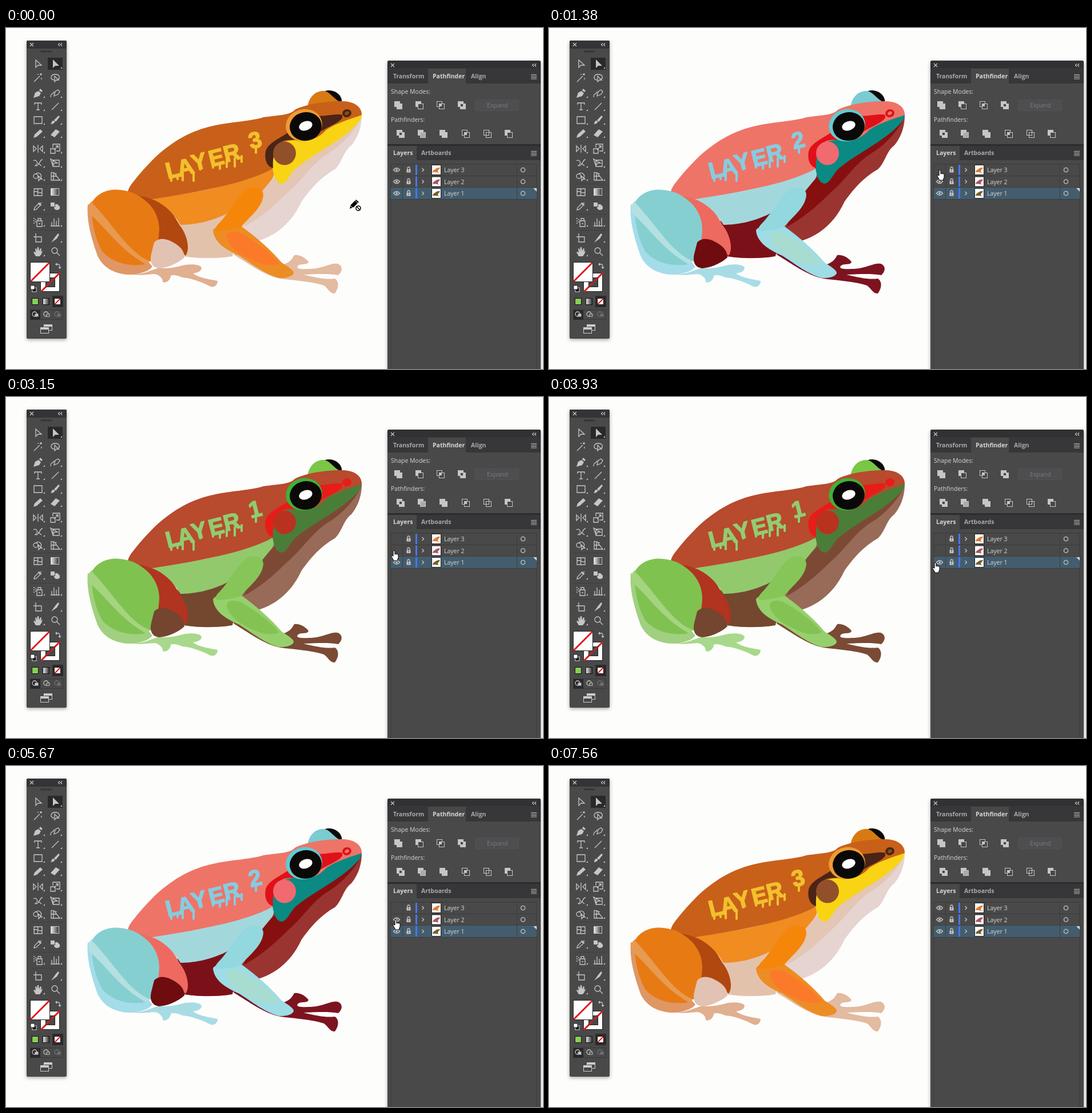
Recreate the animation shown at these times as an HTML page. Size 939 by 596 pixels, loop 7.59 s.

```html
<!DOCTYPE html>
<html lang="en">
<head>
<meta charset="utf-8">
<title>Layer visibility</title>
<style>
html, body { margin: 0; width: 100%; height: 100%; overflow: hidden; background: #fdfdfc; }
svg { display: block; width: 939px; height: 596px; font: 10.5px "Open Sans", "Noto Sans", sans-serif; }
.ui { fill: #d6d6d6; }
.bold { font-weight: 700; }
.dim { fill: #a9a9ac; }
.line { fill: none; stroke: #c6c6c6; stroke-width: 1.3; }
.solid { fill: #c6c6c6; }
.drip { font: 700 40px "Liberation Sans", Arial, sans-serif; fill: var(--text); stroke: var(--text); stroke-width: 1.6; stroke-linejoin: round; }
.p1 { --back: #b84a2e; --bump: #7ac646; --flank: #92c96c; --thigh: #80c250; --lower: #a0d080; --stripe: #a4d480;
  --arm: #86c658; --fore: #96d06c; --shine: #84c254; --belly: #74472f; --throat: #7c4a34; --outer: #986a58;
  --jaw: #4a7e38; --mask: #e81c18; --cheek: #b8321f; --inner: #b03420; --heel: #74452f; --ring: #40b038;
  --hand: #7a4a34; --foot: #a8d88c; --text: #92cc70; --nose: #e81c18; --hole: #e81c18; }
.p2 { --back: #ee7468; --bump: #7acbd2; --flank: #a2d8dc; --thigh: #86cfd0; --lower: #a4dcea; --stripe: #b4e0e2;
  --arm: #92d8de; --fore: #9edce6; --shine: #a8dcd0; --belly: #7c1018; --throat: #861010; --outer: #9a3430;
  --jaw: #0a8a82; --mask: #e01018; --cheek: #f06a70; --inner: #ee6a60; --heel: #6e0c10; --ring: #62cbd0;
  --hand: #7c1420; --foot: #a8dce4; --text: #86cce0; --nose: #e01018; --hole: #ee7468; }
.p3 { --back: #c8601a; --bump: #d87a12; --flank: #f08c20; --thigh: #e87a14; --lower: #df9765; --stripe: #e79a50;
  --arm: #f5860a; --fore: #ee8c24; --shine: #fa7a2a; --belly: #e3c2ac; --throat: #e4c6b4; --outer: #e6d4d0;
  --jaw: #f8d414; --mask: #4a2416; --cheek: #92502a; --inner: #b0480f; --heel: #e2c2b2; --ring: #ee9c34;
  --hand: #e2bba0; --foot: #e0b090; --text: #f2c02c; --nose: #4a2416; --hole: #80520e; }
</style>
</head>
<body>
<svg id="stage" viewBox="0 0 939 596">
  <defs>
    <linearGradient id="fade"><stop stop-color="#eee"/><stop offset="1" stop-color="#333"/></linearGradient>
    <filter id="shadow" x="-20%" y="-5%" width="140%" height="112%"><feDropShadow dx="0" dy="2" stdDeviation="3" flood-opacity=".35"/></filter>
  </defs>
  <g id="frog"></g>
  <g id="tools"></g>
  <g id="panel"></g>
  <g id="pencil">
    <path d="M-8 8L-6 1 3-8 8-4-1 5Z"/>
    <path d="M-6 3L-3 6M1-7L6-2" stroke="#fff"/>
    <circle cx="7" cy="7" r="4" fill="#fff" stroke="#000" stroke-width="1.6"/>
    <path d="M4 4L10 10" stroke="#000" stroke-width="1.5"/>
  </g>
  <path id="pointer" d="M-3-7C-3-9 0-9 0-7V-2C1-4 3-3 3-2 4-3 6-2 6-1V4L4 9H-2L-6 2C-7 0-5-1-3 1Z"
    fill="#fff" stroke="#111" stroke-width="1.1" stroke-linejoin="round"/>
</svg>
<script>
const $ = id => document.getElementById(id);
const rect = (x, y, w, h, fill, more = '') => `<rect x="${x}" y="${y}" width="${w}" height="${h}" fill="${fill}" ${more}/>`;
const oval = (x, y, rx, ry, fill, turn = 0) =>
  `<ellipse cx="${x}" cy="${y}" rx="${rx}" ry="${ry}" transform="rotate(${turn} ${x} ${y})" style="fill:${fill}"/>`;
const label = (x, y, text, cls = '') => `<text x="${x}" y="${y}" class="ui ${cls}">${text}</text>`;
const icon = (x, y, d, cls = 'line') => `<path transform="translate(${x} ${y})" class="${cls}" d="${d}"/>`;
const skin = (part, d) => `<path style="fill:var(--${part})" d="${d}"/>`;
const bodyGrey = '#484849', iconGrey = '#c6c6c6';

function drawFrog() {
  return oval(569, 124, 19, 14, '#0b0908', 25) +
  skin('bump', 'M527 138C531 117 543 110 556 110C568 112 572 124 586 130L560 140Z') +
  skin('outer', 'M622 153C622 178 612 195 604 205C590 215 588 235 575 247C548 262 530 285 517 303C500 340 470 368 425 376L390 400C360 404 330 402 312 399L295 340L450 240Z') +
  skin('throat', 'M621 156C612 180 585 205 570 215C535 235 520 265 490 290C465 315 440 335 415 348L440 290L468 262L500 240Z') +
  skin('belly', 'M300 340L440 300L412 347C400 370 400 380 396 399C360 404 330 402 312 399Z') +
  skin('flank', 'M240 298C330 292 420 270 468 242C470 255 468 262 462 268L448 285L420 300L385 325C355 340 325 344 305 344C295 325 270 305 240 298Z') +
  skin('back', 'M213 288C213 280 220 272 228 262C262 220 300 188 350 174C385 164 425 164 450 156C480 152 497 152 505 143C520 134 560 127 590 128C612 129 623 140 622 153C600 160 575 170 555 190L470 225C468 232 469 240 466 246C420 272 330 288 250 300C235 296 220 292 213 288Z') +
  skin('jaw', 'M622 152C600 160 580 165 560 178C545 195 525 200 505 196C485 196 470 205 466 220V245C468 258 472 271 482 272C492 270 495 258 505 247C530 225 575 203 602 179C614 168 622 160 622 152Z') +
  skin('mask', 'M588 152C578 149 562 154 545 154L550 181C566 171 582 166 588 157ZM498 178C488 190 458 198 454 216C451 232 458 243 467 245C466 226 470 206 482 199C492 193 506 197 520 196Z') +
  oval(487, 219, 20, 20.5, 'var(--cheek)') +
  oval(521, 170, 32, 28, 'var(--ring)', -14) +
  oval(524, 172, 28, 25, '#0b0908', -10) +
  oval(524, 171, 12, 8, '#fff', -20) +
  oval(596, 149, 8, 7, 'var(--nose)', -15) + oval(596, 149, 4, 3, 'var(--hole)', -30) +
  skin('foot', 'M215 428C235 434 250 424 268 419C285 422 300 417 313 414C328 412 342 414 342 420C341 426 333 428 327 429C340 438 357 439 370 442C370 449 364 454 358 452C346 446 326 437 308 436C300 432 292 431 288 433C288 441 279 447 274 444C275 437 266 430 258 430C240 432 225 433 215 428Z') +
  skin('inner', 'M225 292C260 296 288 312 303 344C318 362 322 388 314 398C300 385 275 372 262 372L266 345C264 320 250 302 225 292Z') +
  skin('lower', 'M143 308C140 340 152 375 160 398C172 424 198 432 222 431C242 428 250 424 256 417L242 400L160 312Z') +
  skin('thigh', 'M150 326C152 350 158 372 168 390C185 410 215 418 244 413C205 388 180 350 150 326Z') +
  skin('stripe', 'M150 303C141 310 143 320 147 326C172 345 198 388 245 413L255 405C220 390 190 340 150 303Z') +
  skin('thigh', 'M150 305C165 280 195 278 222 288C252 302 268 325 268 352C267 375 262 395 253 408C215 395 185 340 150 305Z') +
  skin('heel', 'M259 375C268 365 282 369 291 374C305 381 312 390 312 401C300 412 282 419 268 420C254 418 251 408 254 395Z') +
  skin('hand', 'M400 392C430 405 470 415 486 413C497 409 500 404 504 397C512 395 525 402 529 409C527 415 517 411 511 415C506 420 512 422 530 421C555 421 566 410 580 412C590 416 588 426 581 432C565 429 545 430 520 431C545 437 560 440 575 438C583 443 582 455 575 464C566 464 564 456 556 450C530 442 500 441 480 438C450 432 425 412 398 396Z') +
  skin('fore', 'M362 354C364 345 390 345 412 347C440 367 465 390 482 410C495 418 504 424 503 429C498 437 485 437 478 437C455 432 430 412 408 398C385 388 364 375 362 354Z') +
  skin('shine', 'M386 366C384 355 400 354 411 359C440 375 465 395 477 411C470 417 455 414 445 412C415 400 392 388 386 366Z') +
  skin('arm', 'M450 292C450 278 432 276 422 281C400 298 390 325 370 344C362 354 366 356 380 354C395 352 405 351 412 347C425 330 448 315 450 292Z') +
  `<text class="drip" x="283 303 328 358 384 414 428" y="264 260 250 243 235 220 212" rotate="-14">LAYER <tspan id="digit"></tspan></text>
  <path style="stroke:var(--text)" stroke-width="4" stroke-linecap="round" fill="none"
    d="M289 260v7M300 257v7M309 254v12M328 252v15M340 242v5M362 240v4M374 236v10M386 230v13M400 228v14M412 224v10M437 206v12"/>`;
}

// A leading star marks a filled icon
const toolIcons = [
  'M-4-7V6L0 2H6Z', '*M-4-8V7L0 3H7Z',
  'M-7 7L3-3M5-8v4M3-6h4M0-7v2M6 0v3', 'M-2 4C-10 3-8-6 0-6S9 0 5 3M-1-3V7L2 4H6Z',
  '*M-8 8L-5-1 1-4 5 0 2 5ZM2-5L4-8 8-4 6-2Z', 'M-8 7C-8-2-3 4-2-3M-2 5L0-3 5-6 8-3 5 2Z',
  'M-6-3V-6H6V-3M0-6V6M-3 6H3', 'M-6 6L6-6',
  'M-7-6H7V6H-7Z', '*M-8 7C-6 6-7 1-3 1S0 7-8 7ZM-2 0L6-8 8-6 1 3Z',
  '*M-8 8L-6 2 4-7 8-3-2 6Z', '*M-8 3L1-7 8-3-1 7Z',
  'M-8-5V5L-3 0ZM8-5V5L3 0ZM0-7V7', 'M-8 0H0V8H-8ZM-4-2V-8H8V4H2M-2 2L5-5M1-5H5V-1',
  'M-8-4C-2-8 2 2-6 5M-4 5C4 4 2-6 8-6M0 0L6 5', 'M-4-5H7V6H-4ZM-8-7L-4 5-1 0H4Z',
  'M-8 0A4 4 0 1 1 0 0A4 4 0 1 1-8 0M-4-4A5 5 0 1 1 4 4M1 0V8L4 5H7Z', 'M-7-7V7H8L-2-6M-7 0H3M-3-7V7M-7-7L3-4',
  'M-7-6H7V6H-7ZM-7 0C-2-5 2 5 7 0M-2-6C3-2-3 2 0 6', '',
  'M-7 7L-6 3 1-4 4-1-3 6ZM1-6L6-1M3-3L6-6', '*M-8-6H-1V1H-8ZM0-3H4L8 1V5L5 7H1L-2 4V2H0Z',
  'M-2-2H7V8H-2ZM0-2V-6H5V-2M1 3h3M-8-6h2M-8-2h2M-8 2h2M-5-4h2M-5 0h2', 'M-8 7H8M-6 7V0M-2 7V-6M2 7V-2M6 7V-7',
  'M-4-8V4M-8-2H6V7H-4V4', '*M-7 8L0-2 5-8 7-6 3 1Z',
  '*M-4 8L-8 1-6 0-4 2-5-5-3-6-2-1-1-8H1L2-1 4-6 6-5 5 0 8-2 6 4 3 8Z', 'M-6-2a5 5 0 1 1 10 0a5 5 0 1 1-10 0M3 2L8 7'
];
const toolRows = [63, 87, 114, 137, 161, 184, 211, 236, 259, 287, 311, 339, 367, 391];
const singleTools = [0, 2, 3, 18, 19, 21, 24, 27];

function drawTools() {
  let s = rect(36, 22, 70, 521, bodyGrey, 'rx="2" filter="url(#shadow)"') + rect(36, 22, 70, 14, '#343436', 'rx="2"') +
    icon(45, 29, 'M-3-3L3 3M3-3L-3 3') + icon(95, 29, 'M-1-2.5L-3.5 0-1 2.5M3-2.5L.5 0 3 2.5') +
    '<path d="M61 41H80" stroke="#2d2d30" stroke-width="3" stroke-dasharray="2 1"/>' +
    rect(73, 52, 26, 21, '#29292b');
  toolIcons.forEach((d, i) => {
    const x = i % 2 ? 86 : 56, y = toolRows[i >> 1], solid = d[0] == '*';
    s += icon(x, y, solid ? d.slice(1) : d, solid ? 'solid' : 'line');
    if (!singleTools.includes(i)) s += icon(x + 12, y + 8, 'M0-3V0H-3Z', 'solid');
  });
  s += rect(78.5, 280.5, 14, 12, 'url(#fade)', 'stroke="#ccc"');
  [272, 325, 353].forEach(y => s += rect(42, y, 58, 1, '#3f3f41'));
  const red = (x, y, n, w) => `<path d="M${x} ${y + n}L${x + n} ${y}" stroke="#e01818" stroke-width="${w}"/>`;
  s += rect(60.5, 428.5, 33, 32, '#fff', 'stroke="#222"') + red(61, 428, 33, 3) +
    rect(69.5, 436.5, 16, 16, bodyGrey, 'stroke="#222"') + red(70, 437, 15, 2) +
    rect(42.5, 409.5, 34, 34, '#fff', 'stroke="#222"') + red(43, 410, 33, 3) +
    icon(91, 416, 'M-4-3H1Q3-3 3 4M-2-5L-4-3-2-1M1 2L3 4 5 2') +
    rect(46, 454, 7, 7, '#111', 'stroke="#ddd"') + rect(43, 450, 7, 7, '#fff', 'stroke="#222"') +
    rect(81, 468, 19, 20, '#2b2b2d') +
    rect(45.5, 472.5, 11, 11, '#86cf57', 'stroke="#111"') + rect(64.5, 472.5, 11, 11, 'url(#fade)', 'stroke="#111"') +
    rect(84.5, 472.5, 11, 11, '#fff', 'stroke="#111"') + red(85, 473, 10, 2) +
    rect(42.5, 492.5, 57, 17, 'none', 'stroke="#39393b"') + rect(43, 493, 17, 17, '#29292b');
  [51, 71, 90].forEach((x, i) => s += `<g opacity="${i > 1 ? .3 : 1}">` +
    `<circle cx="${x - 1}" cy="500" r="4" class="line"/>` + rect(x, 500, 5, 4, i == 1 ? bodyGrey : iconGrey, `stroke="${iconGrey}"`) + '</g>');
  return s + rect(66.5, 518.5, 14, 10, bodyGrey, 'stroke="#ccc"') + rect(67, 519, 14, 3, '#ccc') +
    rect(60.5, 523.5, 14, 10, bodyGrey, 'stroke="#ccc"') + rect(61, 524, 14, 3, '#ccc');
}

const squares = (x, y, back, front, cut) => rect(x - 6.5, y - 6.5, 9, 9, back, `stroke="${iconGrey}"`) +
  rect(x - 2.5, y - 2.5, 9, 9, front, `stroke="${iconGrey}"`) + (cut ? rect(x - 2, y - 2, 4, 4, cut) : '');
const menu = y => [0, 2.5, 5, 7.5].map(d => rect(918, y + d, 10, 1, '#b8b8b8')).join('');

function drawPanel() {
  const body = bodyGrey, grey = iconGrey;
  let s = rect(667, 57, 268, 560, body, 'rx="3" filter="url(#shadow)"') + rect(667, 57, 268, 15, '#313133', 'rx="3"') +
    rect(667, 70, 268, 27, '#373739') + rect(738, 71, 66, 26, body) + rect(667, 203, 268, 28, '#373739') +
    rect(667, 203, 268, 3, '#2c2c2e') + rect(667, 206, 51, 25, body) +
    icon(676, 65, 'M-3-3L3 3M3-3L-3 3') + icon(924, 65, 'M-1-2.5L-3.5 0-1 2.5M3-2.5L.5 0 3 2.5') +
    label(677, 88, 'Transform', 'bold dim') + label(746, 88, 'Pathfinder', 'bold') + label(813, 88, 'Align', 'bold dim') + menu(81) +
    label(673, 115, 'Shape Modes:') + label(673, 164, 'Pathfinders:') +
    rect(820.5, 125.5, 76, 19, '#4e4e50', 'rx="2" stroke="#525254"') +
    '<text x="841" y="139" fill="#7b7b7e">Expand</text>' +
    label(677, 222, 'Layers', 'bold') + label(726, 222, 'Artboards', 'bold dim') + menu(215);
  s += squares(686, 135, grey, grey) + squares(723, 135, grey, body) + squares(760, 135, body, body, grey) +
    squares(797, 135, grey, grey, body) + squares(690, 185, grey, grey, body) + squares(727, 185, grey, '#aaa') +
    squares(765, 185, grey, grey) + squares(804, 185, body, body, grey) + squares(842, 185, 'none', 'none') + squares(879, 185, grey, body);
  s += rect(673, 238, 255, 370, 'none', 'stroke="#3b3b3d"');
  [3, 2, 1].forEach((n, i) => {
    const y = 248 + i * 20.5, frogTone = { 3: '#e07a30', 2: '#a85560', 1: '#74602a' }[n];
    if (n == 1) s += rect(673, y - 10, 255, 20, '#445d6e');
    s += rect(673, y + 10, 255, 1, '#3b3b3d') + rect(693, y - 10, 1, 20, '#3e3e40') + rect(893, y - 10, 1, 20, '#3e3e40') +
      `<g id="eye${n}">` + icon(683, y, 'M-5.5 0Q0-6.5 5.5 0Q0 6.5-5.5 0Z') + `<circle cx="683" cy="${y}" r="1.8" class="solid"/></g>` +
      icon(704, y, 'M-2-1V-3A2 2 0 0 1 2-3V-1') + rect(700.5, y - 1, 7, 5.5, grey) + rect(703.5, y, 1, 3, body) +
      rect(716, y - 9, 3, 18, '#4478f0') + icon(729, y, 'M-1.5-3L1.5 0-1.5 3') +
      rect(744.5, y - 8.5, 16, 17, '#fff', 'stroke="#222"') +
      `<path transform="translate(753 ${y})" fill="${frogTone}" d="M-7 4Q-6 0-3-1 0-4 5-4L6-3 3 0 2 3 4 5-2 4Z"/>` +
      label(766, y + 4, 'Layer ' + n) + `<circle cx="904" cy="${y}" r="3.6" class="line"/>`;
  });
  return s + '<path d="M922 280H928V286Z" fill="#d6d6d6"/>';
}

$('frog').innerHTML = drawFrog();
$('tools').innerHTML = drawTools();
$('panel').innerHTML = drawPanel();

// Cursor stops: time, x, y
const stops = [[0, 609, 308], [350, 609, 308], [1050, 685, 257], [2250, 685, 257], [2790, 680, 277], [3250, 680, 277],
  [3900, 677, 298], [4860, 684, 300], [5350, 683, 277], [5800, 683, 277], [6330, 655, 260], [6650, 684, 256], [6850, 684, 256], [7050, 960, 290]];

function cursorAt(t) {
  const i = stops.findIndex(s => s[0] > t);
  if (i < 0) return [960, 290];
  const [t0, x0, y0] = stops[i - 1], [t1, x1, y1] = stops[i];
  const k = (t - t0) / (t1 - t0), e = k * k * (3 - 2 * k);
  return [x0 + (x1 - x0) * e, y0 + (y1 - y0) * e];
}

let topLayer = 0;
function showLayer(layer) {
  if (layer == topLayer) return;
  topLayer = layer;
  $('frog').setAttribute('class', 'p' + layer);
  $('digit').textContent = layer;
  for (const n of [1, 2, 3]) $('eye' + n).style.display = n > layer ? 'none' : '';
}

function frame() {
  const t = performance.now() % 7590;
  showLayer(t < 1200 || t >= 6800 ? 3 : t < 3000 || t >= 5550 ? 2 : 1);
  const [x, y] = cursorAt(t), over = x > 668;
  $('pencil').style.display = over ? 'none' : '';
  $('pointer').style.display = over ? '' : 'none';
  $(over ? 'pointer' : 'pencil').setAttribute('transform', `translate(${x} ${y})`);
  requestAnimationFrame(frame);
}
frame();
</script>
</body>
</html>
```
